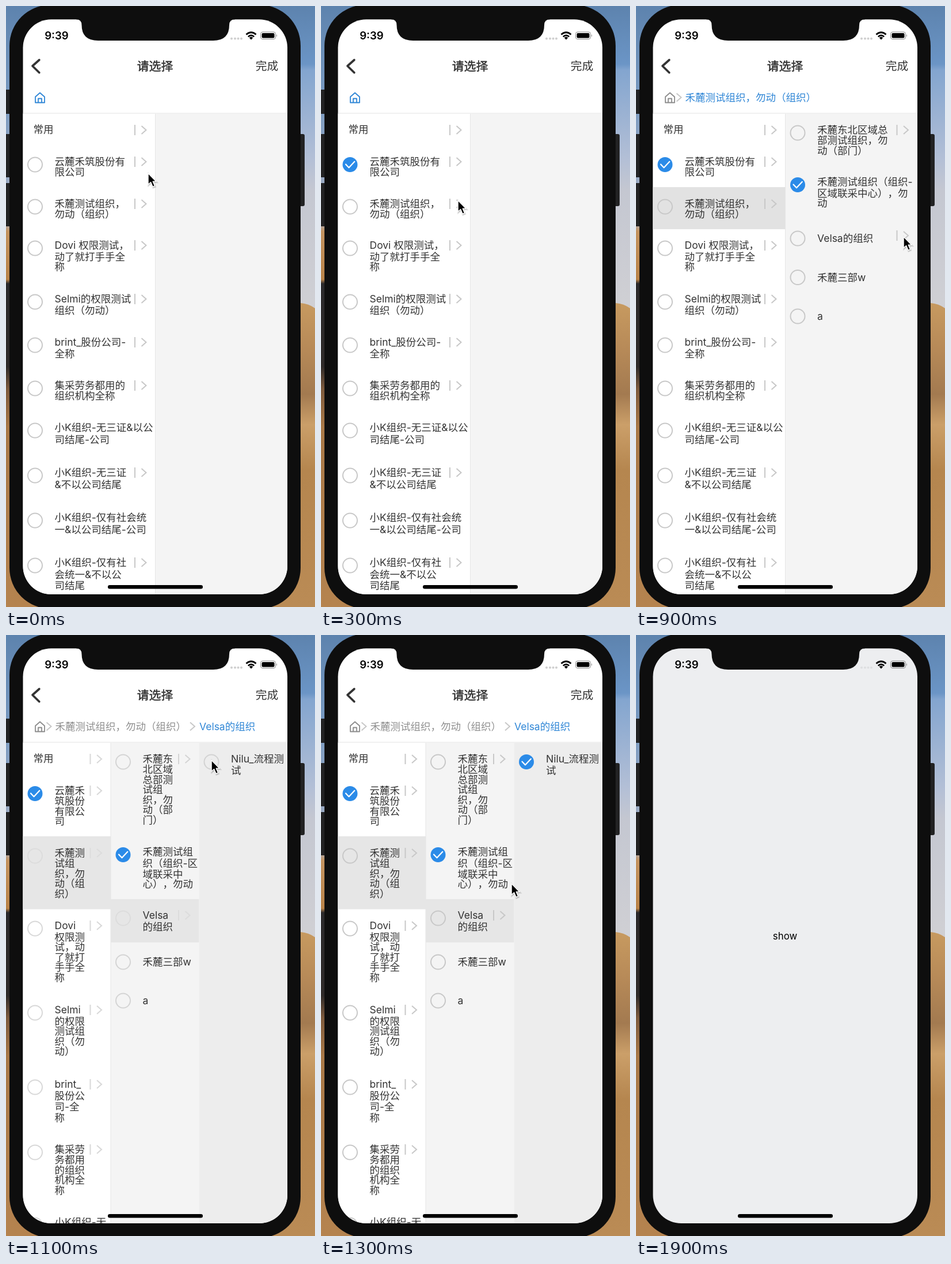
Recreate the animation shown at these times as an HTML page. Size 537x1042 px, loop 2000 ms.

```html
<!DOCTYPE html>
<html lang="zh-CN">
<head>
<meta charset="utf-8">
<title>请选择</title>
<style>
  html, body { margin: 0; width: 100%; height: 100%; overflow: hidden; background: #b5854f; }
  svg { display: block; width: 537px; height: 1042px; }
  text {
    font-family: Inter, "Noto Sans CJK SC", "Noto Sans CJK", sans-serif;
    text-spacing-trim: space-all;
    white-space: pre;
  }
  .title { stroke: #333; stroke-width: .5; }
  .line { fill: none; stroke-linecap: round; stroke-linejoin: round; }
  .mark { fill: none; stroke: #c8c8c8; stroke-width: 2; }
  .fade .mark { opacity: .7; }
  .fade .picked .mark { opacity: .35; }
</style>
</head>
<body>
<svg viewBox="0 0 537 1042">
  <defs>
    <linearGradient id="left" x2="0" y2="1">
      <stop offset="0" stop-color="#5d83ae"/>
      <stop offset=".15" stop-color="#7899c0"/>
      <stop offset=".36" stop-color="#a9b0c2"/>
      <stop offset=".375" stop-color="#c39360"/>
      <stop offset=".455" stop-color="#b98349"/>
      <stop offset=".462" stop-color="#2b2a2c"/>
      <stop offset=".6" stop-color="#2f2b2a"/>
      <stop offset=".637" stop-color="#7d5a3d"/>
      <stop offset=".7" stop-color="#a87847"/>
      <stop offset="1" stop-color="#b5834f"/>
    </linearGradient>
    <linearGradient id="sky" x2="0" y2="1">
      <stop offset="0" stop-color="#5d83ae"/>
      <stop offset=".19" stop-color="#6b95c6"/>
      <stop offset=".21" stop-color="#83a5cf"/>
      <stop offset=".5" stop-color="#b3bfd6"/>
      <stop offset=".6" stop-color="#c4c7d1"/>
      <stop offset="1" stop-color="#d0d0d4"/>
    </linearGradient>
    <linearGradient id="dune" x2="0" y2="1">
      <stop offset="0" stop-color="#c79a60"/>
      <stop offset=".15" stop-color="#b78a58"/>
      <stop offset=".3" stop-color="#a37a50"/>
      <stop offset=".4" stop-color="#cb9f69"/>
      <stop offset=".55" stop-color="#b5864f"/>
      <stop offset="1" stop-color="#ba8b55"/>
    </linearGradient>
    <clipPath id="glass"><rect x="29.500" y="23.300" width="459.500" height="996.700" rx="49"/></clipPath>
  </defs>

  <rect width="270" height="1042" fill="url(#left)"/>
  <rect x="268" width="269" height="530" fill="url(#sky)"/>
  <path d="M268 1042V515H512Q526 516 537 524V1042Z" fill="url(#dune)"/>
  <g fill="#222223">
    <rect x="-4" y="145" width="14" height="42" rx="3"/>
    <rect x="-4" y="222" width="14" height="75" rx="3"/>
    <rect x="-4" y="307" width="14" height="75" rx="3"/>
    <rect x="505" y="222" width="14" height="125" rx="3"/>
  </g>
  <rect x="6" y="-2" width="506" height="1047" rx="71" fill="#0e0e0e"/>
  <g id="screen" clip-path="url(#glass)"></g>
  <path fill="#0e0e0e" d="M122 22V23.300Q131.500 23.300 131.500 33Q131.500 60 160 60H360Q388 60 388 33Q388 23.300 398 23.300V22Z"/>
  <g id="cursor">
    <path d="M0 0V19.500L4.600 15.500L8 23.500L11.600 22L8.300 14.200H14Z" transform="translate(.8 1.500)" fill="#0003" stroke="#0002" stroke-width="3"/>
    <path d="M0 0V19.500L4.600 15.500L8 23.500L11.600 22L8.300 14.200H14Z" fill="#000" stroke="#fff" stroke-width="1.500" stroke-linejoin="round"/>
  </g>
</svg>
<script>
const STEP = 100;
const SIZE = 17.5;
const BLUE = "#2b8be8";
const LINK = "#2f86d6";
const TEAM = "禾麓测试组织，勿动（组织）";

const screen = document.getElementById("screen");
const cursor = document.getElementById("cursor");

// rows: circle y, text lines, flags (> opens a level, * highlighted)
const WIDE = [
  [275, "云麓禾筑股份有|限公司", ">"],
  [348, "禾麓测试组织，|勿动（组织）", ">"],
  [420, "Dovi 权限测试，|动了就打手手全|称", ">"],
  [513, "Selmi的权限测试|组织（勿动）", ">"],
  [588, "brint_股份公司-|全称", ">"],
  [663, "集采劳务都用的|组织机构全称", ">"],
  [736, "小K组织-无三证&以公|司结尾-公司", ""],
  [814, "小K组织-无三证|&不以公司结尾", ">"],
  [892, "小K组织-仅有社会统|一&以公司结尾-公司", ""],
  [970, "小K组织-仅有社|会统一&不以公|司结尾", ">"]
];
const WIDE_PICKED = WIDE.map((r, i) => i === 1 ? [r[0], r[1], ">*"] : r);
const WIDE_SUB = [
  [220, "禾麓东北区域总|部测试组织，勿|动（部门）", ">"],
  [310, "禾麓测试组织（组织-|区域联采中心），勿|动", ""],
  [403, "Velsa的组织", ">"],
  [470.5, "禾麓三部w", ""],
  [538, "a", ""]
];
const SLIM = [
  [275, "云麓禾|筑股份|有限公|司", ">"],
  [383, "禾麓测|试组|织，勿|动（组|织）", ">*"],
  [509, "Dovi|权限测|试，动|了就打|手手全|称", ">"],
  [655, "Selmi|的权限|测试组|织（勿|动）", ">"],
  [784, "brint_|股份公|司-全|称", ">"],
  [897, "集采劳|务都用|的组织|机构全|称", ">"],
  [1023, "小K组织-无|三证", ""]
];
const SLIM_SUB = [
  [220, "禾麓东|北区域|总部测|试组|织，勿|动（部|门）", ">"],
  [381, "禾麓测试组|织（组织-区|域联采中|心），勿动", ""],
  [491, "Velsa|的组织", ">*"],
  [567, "禾麓三部w", ""],
  [634, "a", ""]
];
const LEAF = [[220, "Nilu_流程测|试", ""]];

// scene, cursor x, cursor y, alert shown
const STEPS = [
  ["start", 247, 290],
  ["start", 52, 275],
  ["first", 264, 556, 1],
  ["first", 238, 337],
  ["two", 282, 308],
  ["twoOn", 290, 529, 1],
  ["twoOn", 264, 556, 1],
  ["twoOn", 300, 520],
  ["twoOn", 400, 450],
  ["twoOn", 465, 400],
  ["three", 440, 300],
  ["threeFade", 357, 217],
  ["threeOn", 270, 556, 1],
  ["threeOn", 331, 431],
  ["threeOn", 415, 230],
  ["threeOn", 452, 105],
  ["show", 452, 105],
  ["show"],
  ["show"],
  ["show"]
];

const esc = s => s.replace(/&/g, "&amp;");
const label = (x, y, s, { size = SIZE, fill = "#333", weight = 400, anchor = "start", cls = "" } = {}) =>
  `<text class="${cls}" x="${x}" y="${y + size * .37}" font-size="${size}" fill="${fill}" font-weight="${weight}" text-anchor="${anchor}">${esc(s)}</text>`;
const rect = (x, y, w, h, fill, rx = 0) =>
  `<rect x="${x}" y="${y}" width="${w}" height="${h}" rx="${rx}" fill="${fill}"/>`;
const line = (d, color, width) =>
  `<path class="line" d="${d}" stroke="${color}" stroke-width="${width}"/>`;
const arrow = (x, y) => `<path class="mark" d="M${x - 4} ${y - 7}l8 7l-8 7"/>`;
const opener = (right, y) =>
  `<path class="mark" d="M${right - 35.5} ${y - 9}v18"/>` + arrow(right - 20, y);
const hasLatin = s => /[\w&-]/.test(s) ? 1 : 0;

function paragraph(x, y, text) {
  const lines = text.split("|");
  return lines.map((s, i) => {
    if (i) y += 17.6 + 1.5 * (hasLatin(lines[i - 1]) + hasLatin(s));
    return label(x, y, s);
  }).join("");
}

function circle(x, y, on) {
  return on
    ? `<circle cx="${x}" cy="${y}" r="13" fill="${BLUE}"/>` + line(`M${x - 7.5} ${y - .5}l5.500 5.800l9.800-10.500`, "#fff", 2.2)
    : `<circle class="mark" cx="${x}" cy="${y}" r="12.500"/>`;
}

function column(left, right, rows, { fill, on = -1, band }) {
  let out = rect(left, 187, right - left, 840, fill);
  rows.forEach(([y, text, flags], i) => {
    const picked = flags.includes("*");
    if (picked) out += rect(left, band[0], right - left, band[1] - band[0], band[2]);
    out += `<g class="${picked ? "picked" : ""}">` +
      circle(left + 21.5, y, i === on) +
      paragraph(left + 55.5, text.includes("|") ? y - 5 : y, text) +
      (flags.includes(">") ? opener(right, y - 5) : "") + "</g>";
  });
  return out;
}

function status(faint) {
  const dots = [392, 398, 403.5, 409].map(x =>
    `<circle cx="${x}" cy="56.500" r="2" fill="${faint ? "#dedfe1" : "#cfcfcf"}"/>`).join("");
  return label(88, 51.500, "9:39", { size: 18.6, weight: 600, fill: "#000", anchor: "middle" }) + dots +
    `<g fill="none" stroke="#000" stroke-width="2.800">
      <path d="M417.500 49.500Q426 42 434.500 49.500M420.800 53.200Q426 48.600 431.200 53.200"/></g>
    <path d="M422.800 55Q426 52.200 429.200 55L426 58.500Z"/>
    <rect x="442.500" y="45" width="26" height="12.500" rx="3.500" fill="none" stroke="#8a8a8a"/>` +
    rect(444.5, 47, 22, 8.5, "#000", 2) +
    `<path d="M470 49v4.500q2-2.200 0-4.500" fill="#8a8a8a"/>`;
}

function header(crumbs) {
  const tint = crumbs ? "#8c8c8c" : LINK;
  let out = line("M57.800 93.500L46 104L57.800 115.500", "#333", 3.7) +
    label(259, 104, "请选择", { size: 20.8, anchor: "middle", cls: "title" }) +
    label(453.5, 104, "完成", { size: 19.8, anchor: "middle" }) +
    line("M51 157.500V167.500H67V157.500L59 150.500ZM56 167V160.500H62V167", tint, 1.8) +
    rect(29, 185.5, 460, 1, "#e4e4e4");
  if (crumbs) out += arrow(74.5, 158.500) +
    label(85.5, 158.5, TEAM, { fill: crumbs > 1 ? "#8f8f8f" : LINK });
  if (crumbs > 1) out += arrow(324, 158.500) + label(336, 158.5, "Velsa的组织", { fill: LINK });
  return out;
}

function picker(depth, picks, fade) {
  const [a, b, c] = picks;
  const edge = depth > 2 ? 182 : 259.5;
  let out = rect(29, 23, 460, 997, "#fff");
  if (depth < 3) {
    out += column(29, edge, depth > 1 ? WIDE_PICKED : WIDE, { fill: "#fff", on: a, band: [314, 387, "#e2e2e2"] }) +
      column(edge, 489, depth > 1 ? WIDE_SUB : [], { fill: "#f4f4f4", on: b });
  } else {
    out += column(29, edge, SLIM, { fill: "#fff", on: a, band: [349, 475.5, "#e6e6e6"] }) +
      column(edge, 335.5, SLIM_SUB, { fill: "#f4f4f4", on: b, band: [458, 533, "#e6e6e6"] }) +
      column(335.5, 489, LEAF, { fill: "#ededed", on: c });
  }
  out += rect(edge - .5, 187, 1, 840, "#e6e6e6") + label(47.5, 214, "常用") + opener(edge, 215);
  return `<g class="${fade ? "fade" : ""}">${out}</g>` + header(depth - 1) + status();
}

const alertBox = () =>
  rect(29, 23, 460, 997, "rgba(0,0,0,.43)") +
  rect(94, 458, 331, 128, "#f1f1f1", 16) +
  rect(94, 531, 331, 1, "#d8d8d8") +
  label(259.5, 495, "选中", { size: 20.8, weight: 600, fill: "#000", anchor: "middle" }) +
  label(259.5, 559, "好", { size: 20.8, weight: 600, fill: LINK, anchor: "middle" });

const SCENES = {
  start: () => picker(1, []),
  first: () => picker(1, [0]),
  two: () => picker(2, [0]),
  twoOn: () => picker(2, [0, 1]),
  three: () => picker(3, [0, 1]),
  threeFade: () => picker(3, [0, 1], true),
  threeOn: () => picker(3, [0, 1, 0]),
  show: () => rect(29, 23, 460, 997, "#edeef0") + status(true) +
    label(259, 521.5, "show", { size: 16.8, fill: "#000", anchor: "middle" })
};

let shown = -1;
function draw(now) {
  const i = Math.floor(now / STEP) % STEPS.length;
  if (i !== shown) {
    shown = i;
    const [scene, x, y, alert] = STEPS[i];
    screen.innerHTML = SCENES[scene]() + (alert ? alertBox() : "") + rect(177, 1004, 165, 6.5, "#000", 3.2);
    cursor.style.display = x === undefined ? "none" : "";
    if (x !== undefined) cursor.setAttribute("transform", `translate(${x} ${y})`);
  }
}

const begin = performance.now();
function tick() {
  draw(performance.now() - begin);
  requestAnimationFrame(tick);
}
tick();
</script>
</body>
</html>
```
